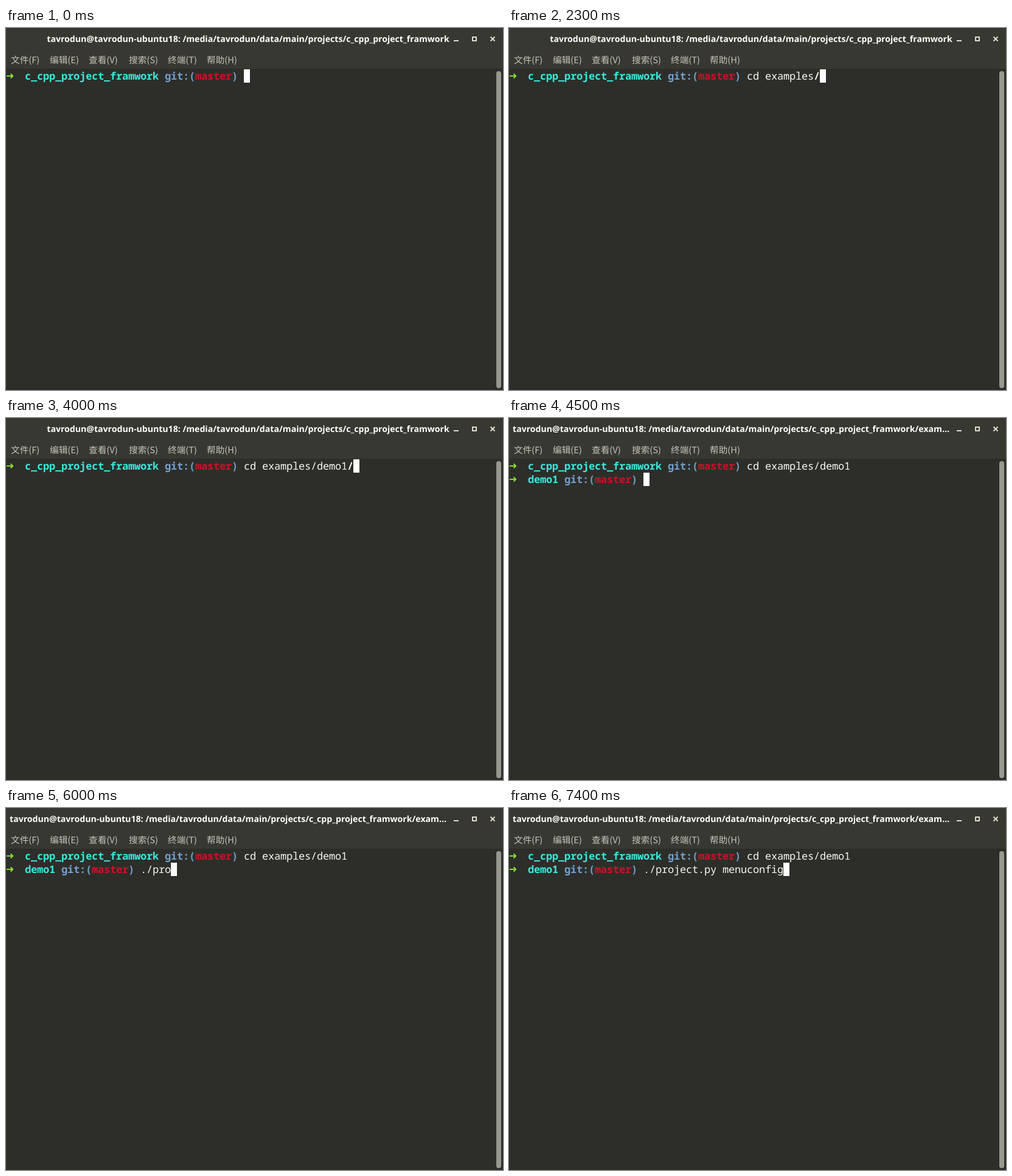
These frames come from a looping animation (817 by 596 pixels, 8 s). An HTML page with a canvas:

```html
<!DOCTYPE html>
<html lang="zh-CN">
<head>
<meta charset="utf-8">
<title>Terminal</title>
<style>
  html, body { margin: 0; width: 100%; height: 100%; overflow: hidden; background: #2d2e29; }
  canvas { display: block; }
</style>
</head>
<body>
<canvas id="stage" width="817" height="596"></canvas>
<script>
const ctx = document.getElementById('stage').getContext('2d');
const LOOP = 8000, CELL = 10, ROW = 22, LEFT = 1, TOP = 68, BASELINE = 17;
const MONO = '17px "Noto Sans Mono", monospace';
const COLOR = {
  bar: '#383833', screen: '#2d2e29', text: '#f8f8f2', button: '#dfdbd2', menu: '#c6c4bc',
  scroll: '#989892', arrow: '#8ae234', dir: '#38e8dc', git: '#729fcf', branch: '#cc1228'
};
const PROJECT = 'c_cpp_project_framwork';
const TITLE = 'tavrodun@tavrodun-ubuntu18: /media/tavrodun/data/main/projects/' + PROJECT;
const MENU = [[8, '文件(F)'], [72, '编辑(E)'], [136, '查看(V)'], [202, '搜索(S)'], [266, '终端(T)'], [330, '帮助(H)']];

// [start ms, command on the active prompt, cursor visible]
const ENTER = 4500;
const STEPS = [
  [0, '', 1], [700, 'cd', 1], [1200, 'cd ', 1], [1700, 'cd e', 1], [2000, 'cd ex', 1],
  [2300, 'cd examples/', 1], [2800, 'cd examples/', 0], [3200, 'cd examples/', 1],
  [3500, 'cd examples/d', 1], [4000, 'cd examples/demo1/', 1],
  [ENTER, '', 1], [4600, '', 0], [5100, '.', 1], [5200, './', 1], [5700, './p', 1],
  [5900, './pr', 1], [6000, './pro', 1], [6200, './project.py ', 1], [6700, './project.py ', 0],
  [6900, './project.py ', 1], [7000, './project.py m', 1], [7400, './project.py menuconfig', 1]
];

function label(text, x, y, font, color, align = 'left') {
  ctx.font = font;
  ctx.fillStyle = color;
  ctx.textAlign = align;
  ctx.fillText(text, x, y);
}

function box(x, y, w, h, color) {
  ctx.fillStyle = color;
  ctx.fillRect(x, y, w, h);
}

// Writes one glyph centred in each terminal cell and returns the next free column.
function write(text, col, row, color, bold) {
  const font = (bold ? '600 ' : '') + MONO;
  for (const ch of text) {
    label(ch, LEFT + (col + 0.5) * CELL, TOP + row * ROW + BASELINE, font, color, 'center');
    col++;
  }
  return col;
}

function prompt(dir, row) {
  label('➜', 0, TOP + row * ROW + BASELINE - 1, '16px "DejaVu Sans", sans-serif', COLOR.arrow);
  let col = write(dir, 3, row, COLOR.dir, true);
  col = write(' git:(', col, row, COLOR.git, true);
  col = write('master', col, row, COLOR.branch, true);
  return write(') ', col, row, COLOR.git, true);
}

function drawWindow(inDemo) {
  box(0, 0, 817, 596, COLOR.screen);
  box(0, 0, 817, 67, COLOR.bar);
  label(inDemo ? TITLE + '/exam…' : TITLE, inDemo ? 365 : 398, 23,
    'bold 14.12px "Open Sans", sans-serif', '#fff', 'center');

  box(736, 20, 8, 2, COLOR.button);
  ctx.strokeStyle = COLOR.button;
  ctx.lineWidth = 2;
  ctx.strokeRect(767, 15, 6, 6);
  ctx.beginPath();
  ctx.moveTo(796.5, 14.5);
  ctx.lineTo(803.5, 21.5);
  ctx.moveTo(803.5, 14.5);
  ctx.lineTo(796.5, 21.5);
  ctx.stroke();

  for (const [x, text] of MENU) {
    label(text, x, 58, '14.67px "Noto Sans CJK SC", "Noto Sans CJK", sans-serif', COLOR.menu);
  }

  ctx.fillStyle = COLOR.scroll;
  ctx.beginPath();
  ctx.roundRect(806, 71, 8, 522, 4);
  ctx.fill();
}

function draw(time) {
  const [, command, cursor] = STEPS.findLast(step => step[0] <= time);
  const inDemo = time >= ENTER;
  drawWindow(inDemo);

  let row = 0;
  let col = prompt(PROJECT, row);
  if (inDemo) {
    write('cd examples/demo1', col, row, COLOR.text);
    col = prompt('demo1', ++row);
  }
  // A slash added by tab completion stays bold until the next key.
  const completed = !inDemo && command.endsWith('/');
  const plain = completed ? command.slice(0, -1) : command;
  col = write(plain, col, row, COLOR.text);
  if (completed) col = write('/', col, row, COLOR.text, true);
  if (cursor) box(LEFT + col * CELL, TOP + row * ROW, CELL, ROW, '#fff');
}

ctx.textRendering = 'geometricPrecision';
const start = performance.now();
function tick() {
  draw((performance.now() - start) % LOOP);
  requestAnimationFrame(tick);
}
tick();
</script>
</body>
</html>
```
